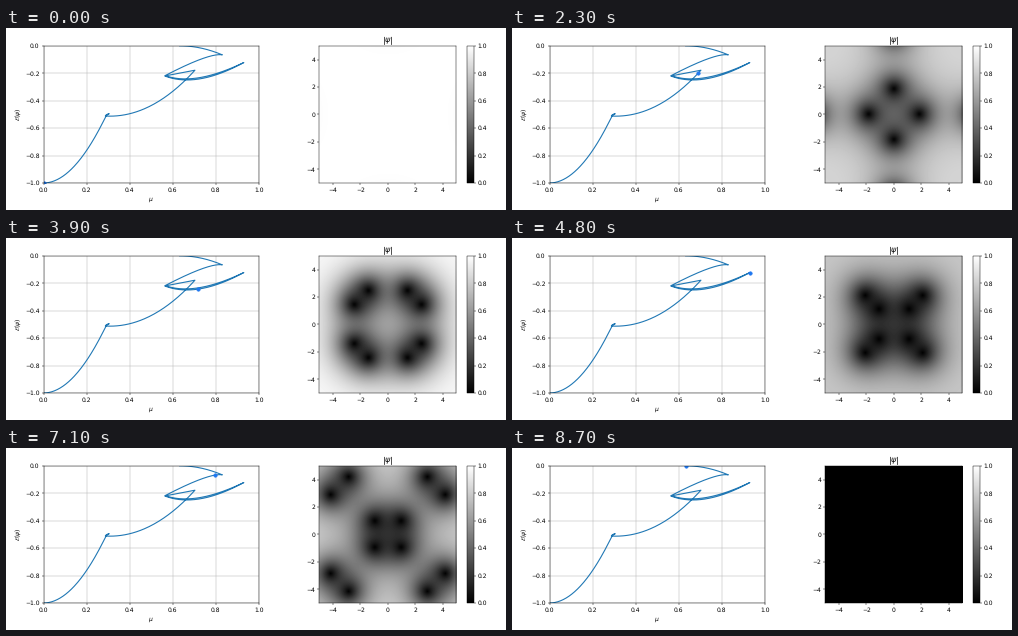
Recreate the animation shown at these times as a matplotlib script. Size 500 px wide and 182 px high, loop 8.8 s.

```python
import numpy as np
import matplotlib.pyplot as plt
from matplotlib.animation import FuncAnimation

W, H = 500, 182
FRAMES, STEP = 88, 100
DPI = W / 12

plt.rcParams.update({"font.family": "DejaVu Sans", "text.hinting": "none",
                     "text.hinting_factor": 1, "axes.labelsize": 11,
                     "axes.titlesize": 14})

# Each leg of the branch is a quadratic arc: end frame, control point, end point.
START = (0, -1)
LEGS = [
    (11, (.14, -1), (.29, -.512)),
    (12, (.297, -.5), (.305, -.495)),
    (14, (.29, -.5), (.287, -.512)),
    (23.3, (.5, -.53), (.703, -.178)),
    (31, (.63, -.2), (.563, -.22)),
    (48, (.71, -.31), (.93, -.122)),
    (61, (.70, -.295), (.565, -.217)),
    (74, (.77, -.05), (.83, -.066)),
    (87, (.73, 0), (.632, 0)),
]


def branch_point(i):
    """Parameter mu and energy at frame i."""
    t0, p0 = 0, START
    for t1, ctrl, p1 in LEGS:
        if i <= t1:
            break
        t0, p0 = t1, p1
    u = min((i - t0) / (t1 - t0), 1)
    return [(1 - u)**2 * a + 2 * u * (1 - u) * b + u**2 * c
            for a, b, c in zip(p0, ctrl, p1)]


def vortices(i):
    """One quarter of the vortices; a pair meets, then parts at right angles."""
    turn = np.exp(.25j * np.pi)
    core = []
    if i <= 31:
        turn = 1
        keys = [0, 14, 23, 31]
        mid = np.interp(i, keys, [10.5, 7.9, 3.88, 3.1])
        gap2 = np.interp(i, keys, [2.25, 17.2, 4.1, -1.96])
    elif i <= 48:
        mid = np.interp(i, [31, 48], [3.18, 2.26])
        gap2 = np.interp(i, [31, 48], [-1.44, .5])
    else:
        mid = np.interp(i, [48, 61], [6, 5])
        gap2 = np.interp(i, [48, 61], [9.1, -.85])
        core = [np.interp(i, [48, 61], [1.56, 1.36])]
    gap = np.sqrt(complex(gap2))
    return [r * turn for r in (mid - gap, mid + gap, *core)]


axis = np.linspace(-5, 5, 101)
X, Y = np.meshgrid(axis, axis)
Z = X + 1j * Y


def field(i):
    psi = np.ones_like(X)
    for z in vortices(i):
        for k in range(4):
            psi *= np.tanh(abs(Z - z * 1j**k) / 1.6)
    # the energy is minus the mean of |psi|^4, which fixes the amplitude
    energy = branch_point(i)[1]
    return psi * (-energy / np.mean(psi**4))**.25


fig = plt.figure(figsize=((W + .01) / DPI, (H + .01) / DPI), dpi=DPI)


def box(x, y, w, h):
    return fig.add_axes([x / W, 1 - (y + h) / H, w / W, h / H])


left = box(37.5, 17.8, 215.4, 137.2)
path = np.array([branch_point(t) for t in np.linspace(0, FRAMES - 1, 871)])
left.plot(*path.T, color="#1f77b4", lw=1.9)
marker, = left.plot([], [], "o", color="#1f77f0")
left.set(xlim=(0, 1), ylim=(-1, 0), xlabel=r"$\mu$", ylabel=r"$\mathcal{E}(\psi)$")
left.grid(True)

right = box(313.2, 17.8, 137.2, 137.2)
image = right.imshow(np.ones_like(X), cmap="gray", vmin=0, vmax=1, origin="lower",
                     extent=(-5, 5, -5, 5), interpolation="bilinear", aspect="auto")
right.set_title(r"$|\psi|$", pad=5)
right.set(xticks=range(-4, 5, 2), yticks=range(-4, 5, 2))
fig.colorbar(image, cax=box(460.8, 17.8, 6.9, 137.2))


def draw(i):
    mu, energy = branch_point(i)
    marker.set_data([mu], [energy])
    image.set_data(field(i))
    return marker, image


anim = FuncAnimation(fig, draw, frames=FRAMES, interval=STEP, repeat=True,
                     repeat_delay=0, blit=False)
plt.show()
```
